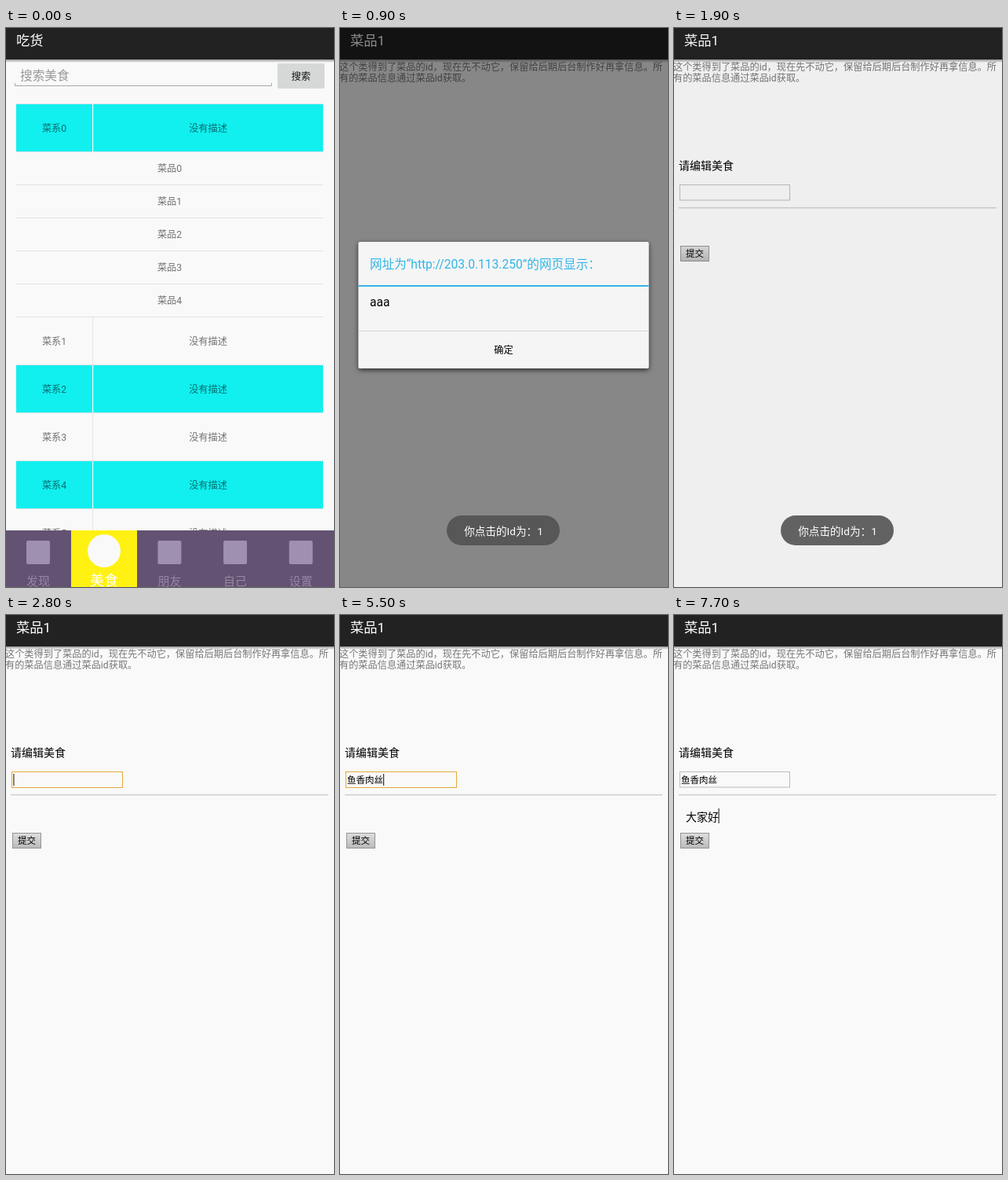
An HTML page that plays this animation: 418 px wide and 711 px high, repeating every 8000 ms.

```html
<!DOCTYPE html>
<html lang="zh-CN">
<head>
<meta charset="utf-8">
<style>
html, body { margin: 0; width: 100%; height: 100%; overflow: hidden; background: #f9f9f9; }
svg { display: block; width: 418px; height: 711px; }
text { font-family: Roboto, "Noto Sans CJK SC", sans-serif; white-space: pre; }
.mid { font-family: "Noto Sans CJK TC", "Noto Sans CJK SC", sans-serif; }
</style>
</head>
<body>
<svg id="stage" viewBox="0 0 418 711">
  <defs>
    <linearGradient id="btn" x2="0" y2="1"><stop stop-color="#dedede"/><stop offset="1" stop-color="#bababa"/></linearGradient>
    <linearGradient id="fall" x2="0" y2="1"><stop stop-color="#000" stop-opacity=".4"/><stop offset="1" stop-color="#000" stop-opacity="0"/></linearGradient>
    <filter id="soft" x="-10%" y="-10%" width="120%" height="130%"><feDropShadow dx="0" dy="2" stdDeviation="3" flood-opacity=".7"/></filter>
  </defs>
  <g id="scene"></g>
</svg>
<script>
const scene = document.getElementById('scene');
const GREY = 'rgba(0,0,0,.54)', OLIVE = '#80800f';

const rect = (x, y, w, h, fill, more = '') =>
  `<rect x="${x}" y="${y}" width="${w}" height="${h}" fill="${fill}" ${more}/>`;
// Commas and colons sit in the middle of their cell
const text = (x, y, size, fill, s, more = '') =>
  `<text x="${x}" y="${y}" font-size="${size}" fill="${fill}" ${more}>${
    s.replace(/[，：]/g, c => `<tspan class="mid">${c}</tspan>`)}</text>`;
const centred = (x, y, size, fill, s, more = '') =>
  text(x, y, size, fill, s, 'text-anchor="middle" ' + more);
const fade = (alpha, s) => alpha > 0 ? `<g opacity="${alpha}">${s}</g>` : '';
// Value of the last [time, value] pair already reached
const at = (steps, t, first = 0) =>
  steps.reduce((v, [time, next]) => t >= time ? next : v, first);

const header = title =>
  rect(0, 0, 418, 40, '#222') + rect(0, 40, 418, 4, 'url(#fall)') +
  text(13, 21.5, 17.3, '#fff', title);

function row(i) {
  const y = i ? 307 + 61 * i : 97, cyan = i % 2 === 0;
  return (cyan ? rect(13, y, 391, 60, '#11efef') : '') +
    rect(110, y, 1.2, 60, cyan ? '#f2ffff' : '#e6e6e6') +
    rect(13, y + 60, 391, 1, '#e2e2e2') +
    centred(61.5, y + 34.6, 12.2, GREY, '菜系' + i) +
    centred(257.5, y + 34.6, 12.2, GREY, '没有描述');
}

function tab(name, i) {
  const x = 41 + 83.7 * i;
  if (i === 1) return rect(83, 639, 84, 72, '#fff112') +
    '<circle cx="125" cy="665" r="21" fill="#f9f9f9"/>' +
    centred(125, 708.8, 18, '#fff', name, 'font-weight="500"');
  return rect(x - 15, 652, 30, 30, '#9f8fb0', 'rx="2"') +
    centred(x, 708.5, 15, '#9687a7', name);
}

function list() {
  let s = rect(0, 0, 418, 711, '#f9f9f9') + header('吃货') +
    '<path d="M11.5 70V73.5H338.5V70" fill="none" stroke="#a8a8a8"/>' +
    text(18, 66, 15.7, '#999', '搜索美食') +
    rect(346, 45, 60, 32, '#d6d7d7', 'rx="2"') +
    centred(376, 65.6, 12.2, '#111', '搜索') +
    rect(13, 96, 391, 1, '#e2e2e2');
  for (let i = 0; i < 6; i++) s += row(i);
  for (let i = 0; i < 5; i++)
    s += centred(208.5, 182.6 + 42 * i, 12.2, GREY, '菜品' + i) +
      rect(13, 199 + 42 * i, 391, 1, '#e2e2e2');
  return s + rect(0, 639, 418, 72, '#635271') +
    ['发现', '美食', '朋友', '自己', '设置'].map(tab).join('');
}

const page = () => rect(0, 0, 418, 711, '#f9f9f9') + header('菜品1') +
  text(-1, 53.5, 12.2, '#777', '这个类得到了菜品的id，现在先不动它，保留给后期后台制作好再拿信息。所') +
  text(-1, 67.5, 12.2, '#777', '有的菜品信息通过菜品id获取。');

const dialog = pressed =>
  rect(23.5, 272, 370, 161, '#f5f5f5', 'rx="2" filter="url(#soft)"') +
  text(38, 305.6, 15.6, '#33b5e5', '网址为“http://203.0.113.250”的网页显示：') +
  rect(23.5, 327, 370, 2, '#33b5e5') +
  text(38, 353.5, 15.6, '#000', 'aaa') +
  (pressed ? rect(23.5, 386, 370, 47, '#e1e1e1') : '') +
  rect(23.5, 385, 370, 1, '#d6d6d6') +
  centred(208.5, 414.2, 12.2, '#000', '确定');

const toast = () =>
  rect(136, 620, 144, 38, 'rgba(81,81,81,.89)', 'rx="19"') +
  centred(208.5, 645, 13.6, '#fff', '你点击的Id为：1');

function form(t) {
  const focus = t >= 2500 && t < 5900, done = t >= 5000;
  const caret = (from, x, y, h) =>
    t >= from && (t - from) % 1000 < 500 ? rect(x, y, 1.2, h, '#333') : '';
  return text(6, 180.3, 14, '#000', '请编辑美食') +
    rect(7.5, 199.5, focus ? 141 : 140, focus ? 20 : 19.5, '#f9f9f9',
      `stroke="${focus ? '#e5a93f' : '#bcbcbc'}"`) +
    (done ? text(9, 213.5, 11.5, '#000', '鱼香肉丝') : '') +
    (focus ? caret(2500, done ? 55 : 9.3, 202, 15) : '') +
    rect(6, 228, 405, 1, '#cfcfcf') + rect(6, 229, 405, 1, '#e6e6e6') +
    (t >= 7700 ? text(15, 262, 14, '#000', '大家好') + rect(56.5, 246, 1.2, 19, '#333')
      : caret(6000, 14.5, 246, 19)) +
    rect(8.5, 277.5, 36, 19, 'url(#btn)', 'stroke="#949494"') +
    centred(26.5, 291.4, 11.5, '#000', '提交');
}

function mushroom() {
  const spots = [[198, 16, 5, 3.5], [182, 22, 3.5, 4], [199, 34, 6, 5.5],
    [213, 24, 4.5, 5.5], [218, 38, 3, 4], [179, 33, 3, 3]];
  return '<g stroke="#1c0b08" stroke-width="1.3">' +
    '<path d="M187 38Q186 51 190 54Q202 58 213 52Q217 46 213 38Z" fill="#c8ad84"/>' +
    '<path d="M174 38C170 23 183 11 198 11C215 11 226 26 222 42Q217 48 207 41Q195 36 186 42Q178 44 174 38Z" fill="#d0121b"/></g>' +
    spots.map(([x, y, rx, ry]) =>
      `<ellipse cx="${x}" cy="${y}" rx="${rx}" ry="${ry}" fill="#9fb4e2"/>`).join('');
}

// Typed letters and the words offered for them
const typing = [
  [3400, 'y', '一 有 也 要 与'], [3600, 'yu', '与 于 鱼 雨 语'],
  [3700, "yu'x", '预习 预先 淤血 玉玺'], [3800, "yu'xi", '预习 玉玺 余息 鱼'],
  [3900, "yu'xia", '余下 雨下 玉霞 鱼'], [4000, "yu'xian", '预先 遇险 鱼鲜 鱼'],
  [4100, "yu'xiang", '鱼香 预想 玉香 遇象'], [4300, "yu'xiang'r", '鱼香肉 鱼香 预想 鱼'],
  [4400, "yu'xiang'ro", '鱼香肉 鱼香 预想 鱼'], [4500, "yu'xiang'rou", '鱼香肉 鱼香 预想 鱼'],
  [4700, "yu'xiang'rou's", '鱼香肉丝 鱼香 预想 鱼'], [4800, "yu'xiang'rou'si", '鱼香肉丝 鱼香 预想 鱼'],
  [5000], [6700, 'd', '的 到 都 大 地'], [6900, 'da', '大 打 达 答 搭'],
  [7200, "da'j", '大家 打击 大街 大奖'], [7300, "da'ji", '打击 大吉 大计 大'],
  [7400, "da'jia", '大家 打架 大加 大'], [7500, "da'jia'h", '大家好 大家 打架 大'], [7700]
].map(([time, ...entry]) => [time, entry]);

function ime(t) {
  const [letters, words] = at(typing, t, []);
  if (!letters) return '';
  const offers = words.split(' ').map((w, i) =>
    `<tspan dx="${i ? 9 : 0}" fill="${i ? OLIVE : '#e0141c'}">${i + 1}.${w}</tspan>`).join('');
  return rect(200, 38, 260, 65, '#fff', `rx="10" stroke="${OLIVE}" stroke-width="2"`) +
    text(221, 60, 16, OLIVE, letters +
      '<tspan dx="-1" dy="-1" font-weight="300" font-size="18" fill="#e0141c">|</tspan>', 'font-weight="700"') +
    rect(214, 69, 204, 1, '#dcdcdc') +
    text(215, 90, 16, OLIVE, offers, 'font-weight="300"') + mushroom();
}

const pageIn = [[600, .5], [700, 1]];
const dim = [[800, .25], [900, .46], [1000, .6], [1800, .35], [1900, .04], [2000, 0]];
const dialogIn = [[800, .6], [900, 1], [1800, .4], [1900, 0]];
const toastIn = [[700, .5], [800, 1], [2500, .75], [2600, .5], [2700, .25], [2800, 0]];

const draw = t =>
  (t < 700 ? list() : '') + fade(at(pageIn, t), page()) +
  (t >= 1900 ? form(t) : '') +
  fade(at(dim, t), rect(0, 0, 418, 711, '#000')) +
  fade(at(dialogIn, t), dialog(t >= 1700)) +
  fade(at(toastIn, t), toast()) + ime(t);

let shown = -1;
function tick() {
  const t = Math.floor(performance.now() % 8000 / 100) * 100;
  if (t !== shown) scene.innerHTML = draw(shown = t);
  requestAnimationFrame(tick);
}
tick();
</script>
</body>
</html>
```
